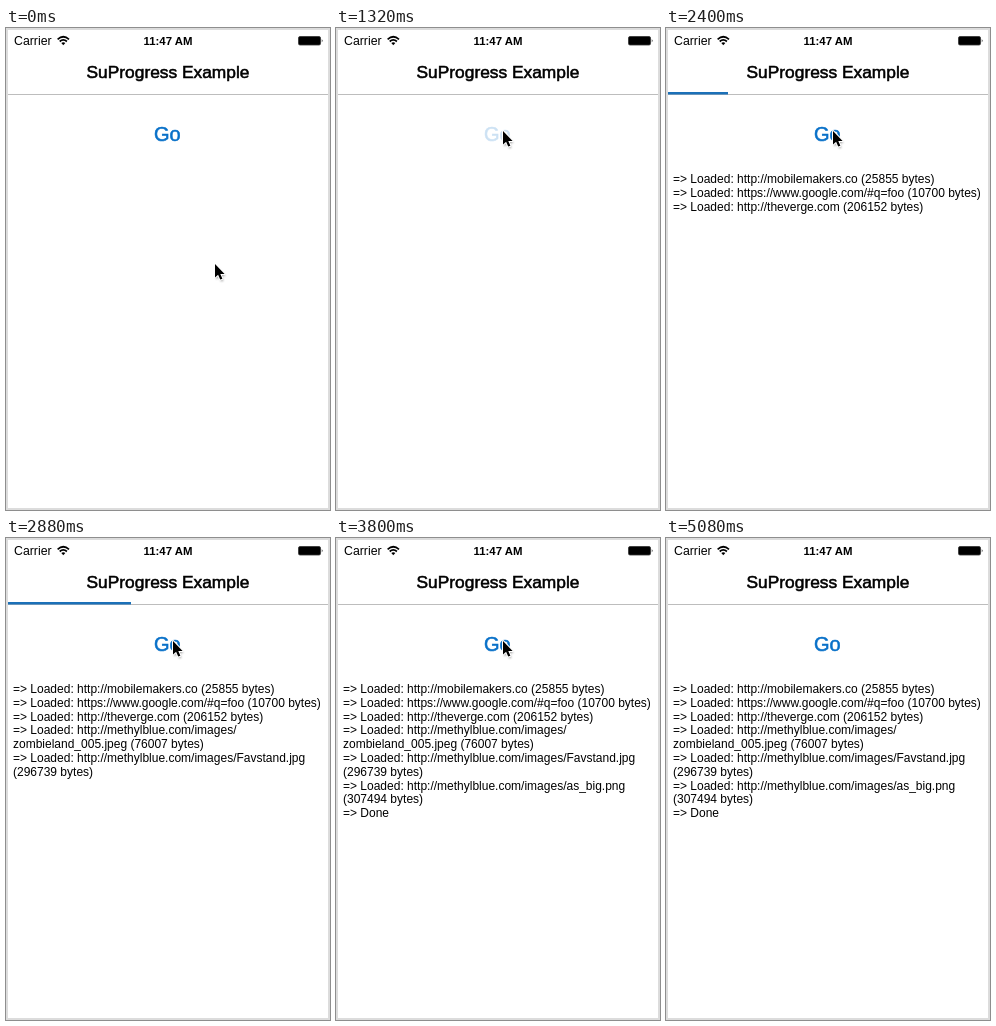
An HTML page that plays this animation: 324 by 482 pixels, repeating every 5120 ms.

```html
<!DOCTYPE html>
<html lang="en">
<head>
<meta charset="utf-8">
<title>SuProgress Example</title>
<style>
  html, body { margin: 0; width: 100%; height: 100%; overflow: hidden; background: #fff; }
  svg { display: block; font-family: "Liberation Sans", Arial, sans-serif; }
  .medium { stroke-width: .55; paint-order: stroke; }
</style>
</head>
<body>
<svg width="324" height="482" viewBox="0 0 324 482">
  <defs>
    <filter id="soft" x="-50%" y="-50%" width="200%" height="200%">
      <feGaussianBlur stdDeviation="1"/>
    </filter>
    <path id="arrow" d="M0 0V13.6L3.1 10.7L5.2 15.6L7.4 14.7L5.3 9.9H9.6Z"/>
  </defs>
  <rect width="324" height="482" fill="#fff"/>

  <text x="8" y="17" font-size="12.3">Carrier</text>
  <g fill="none" stroke="#000" stroke-width="1.7">
    <path d="M51.6 11.3Q57.3 6.2 63 11.3"/>
    <path d="M53.7 13.5Q57.3 10.2 60.9 13.5"/>
  </g>
  <path d="M55.3 15.1Q57.3 13.3 59.3 15.1L57.3 17.2Z"/>
  <text x="162" y="17" font-size="11.4" font-weight="700" text-anchor="middle">11:47 AM</text>
  <rect x="292.5" y="8.5" width="22" height="8.5" rx="1.5" fill="#000" stroke="#333" stroke-width=".8"/>
  <path d="M315.8 11Q317.4 12.7 315.8 14.5Z"/>

  <text class="medium" x="162" y="50" font-size="17.35" stroke="#000" text-anchor="middle">SuProgress Example</text>
  <rect x="2" y="66" width="320" height="1" fill="#bdbdbd"/>
  <rect id="bar" x="2" y="64" width="0" height="2.5" fill="#1b70b8"/>
  <text id="go" class="medium" x="161.3" y="113" font-size="20" fill="#0870c8" stroke="#0870c8" text-anchor="middle">Go</text>
  <g id="log" font-size="12"></g>
  <rect x="1" y="1" width="322" height="480" fill="none" stroke="#dcdcdc" stroke-width="2"/>

  <g id="cursor">
    <use href="#arrow" x="1" y="2" opacity=".4" filter="url(#soft)"/>
    <use href="#arrow" stroke="#fff" stroke-width="2" stroke-linejoin="round"/>
    <use href="#arrow"/>
  </g>
</svg>
<script>
const LOOP = 5120, STEP = 40;
const $ = id => document.getElementById(id);
const bar = $("bar"), go = $("go"), log = $("log"), cursor = $("cursor");

// [time of appearance, text]
const lines = [
  [1760, "=> Loaded: http://mobilemakers.co (25855 bytes)"],
  [1840, "=> Loaded: https://www.google.com/#q=foo (10700 bytes)"],
  [2120, "=> Loaded: http://theverge.com (206152 bytes)"],
  [2560, "=> Loaded: http://methylblue.com/images/"],
  [2560, "zombieland_005.jpeg (76007 bytes)"],
  [2760, "=> Loaded: http://methylblue.com/images/Favstand.jpg"],
  [2760, "(296739 bytes)"],
  [3240, "=> Loaded: http://methylblue.com/images/as_big.png"],
  [3240, "(307494 bytes)"],
  [3240, "=> Done"]
].map(([at, str], i) => {
  const el = document.createElementNS("http://www.w3.org/2000/svg", "text");
  el.setAttribute("x", 7);
  el.setAttribute("y", Math.round(155 + 13.8 * i));
  el.textContent = str;
  log.append(el);
  return { at, el };
});

const barKeys = [[1760, 0], [2000, 22], [2400, 60], [2880, 123], [3240, 205], [3440, 320]];

const part = (t, a, b) => Math.min(1, Math.max(0, (t - a) / (b - a)));
const smooth = p => p * p * (3 - 2 * p);
const mix = (a, b, p) => a + (b - a) * p;

function track(keys, t) {
  let value = keys[0][1];
  for (let i = 1; i < keys.length; i++) {
    const [t0, v0] = keys[i - 1], [t1, v1] = keys[i];
    if (t >= t0) value = mix(v0, v1, part(t, t0, t1));
  }
  return value;
}

function cursorAt(t) {
  const rise = smooth(part(t, 0, 600));
  const settle = smooth(part(t, 600, 720));
  const leave = part(t, 4200, 4520) ** 3;
  return [
    mix(209, 173, rise) - 6 * settle + 160 * leave,
    mix(236, 97, rise) + 6 * settle - 70 * leave
  ];
}

function draw(t) {
  const [x, y] = cursorAt(t);
  cursor.setAttribute("transform", `translate(${x} ${y})`);
  cursor.style.display = t < 4520 ? "" : "none";

  go.style.opacity = t < 1320 ? 1 : mix(.2, 1, smooth(part(t, 1440, 1800)));

  bar.setAttribute("width", track(barKeys, t));
  bar.style.opacity = 1 - part(t, 3440, 3640);

  for (const { at, el } of lines) el.style.display = t >= at ? "" : "none";
}

const start = performance.now();
function frame() {
  const t = (performance.now() - start) % LOOP;
  draw(Math.floor(t / STEP) * STEP);
  requestAnimationFrame(frame);
}
draw(0);
requestAnimationFrame(frame);
</script>
</body>
</html>
```
